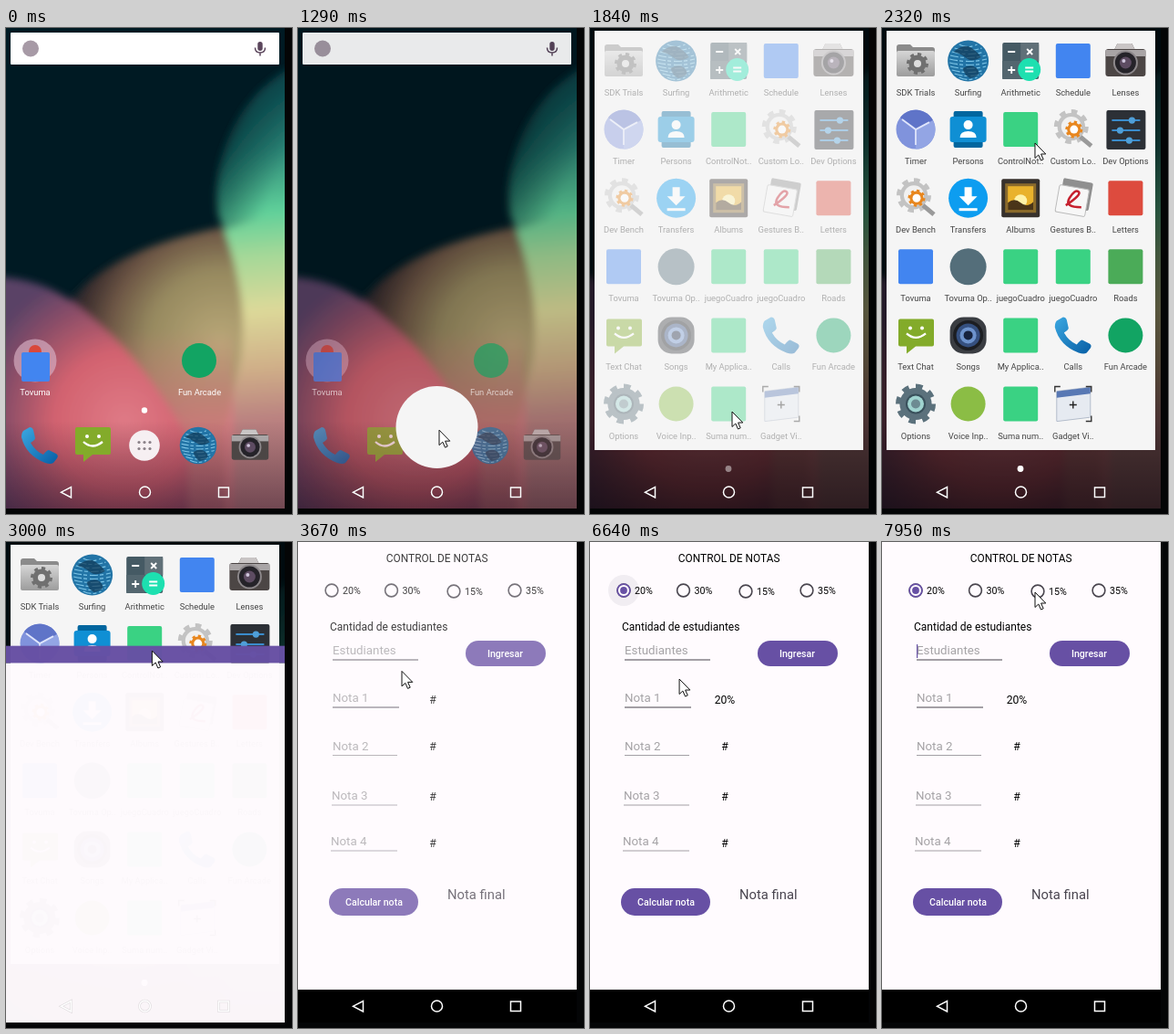
An HTML page that plays this animation: 314x532 px, repeating every 8000 ms.

```html
<!DOCTYPE html>
<html lang="es">
<head>
<meta charset="utf-8">
<title>Control de notas</title>
<style>
  html, body { margin: 0; width: 100%; height: 100%; overflow: hidden; background: #000; }
  svg { display: block; width: 314px; height: 532px; }
  text { font-family: Roboto, "Open Sans", sans-serif; }
  .label { font-size: 9.4px; text-anchor: middle; }
  .mid { text-anchor: middle; }
  .hint { font-size: 13.3px; fill: #a5a3a6; }
  .button { font-size: 10.6px; font-weight: 500; fill: #fff; text-anchor: middle; }
</style>
</head>
<body>
<svg id="stage" viewBox="0 0 314 532" xmlns="http://www.w3.org/2000/svg"></svg>
<script>
const LOOP = 8000;

// ---------- small drawing helpers ----------
const circle = (x, y, r, fill, extra = '') => `<circle cx="${x}" cy="${y}" r="${r}" fill="${fill}" ${extra}/>`;
const rect = (x, y, w, h, fill, rx = 0, extra = '') =>
  `<rect x="${x}" y="${y}" width="${w}" height="${h}" rx="${rx}" fill="${fill}" ${extra}/>`;
const path = (d, fill, extra = '') => `<path d="${d}" fill="${fill}" ${extra}/>`;
const line = (d, color, width, extra = '') =>
  `<path d="${d}" fill="none" stroke="${color}" stroke-width="${width}" ${extra}/>`;
const text = (x, y, str, cls, extra = '') => `<text x="${x}" y="${y}" class="${cls}" ${extra}>${str}</text>`;
const group = (id, body, extra = '') => `<g id="${id}" ${extra}>${body}</g>`;
const at = (x, y, body) => `<g transform="translate(${x} ${y})">${body}</g>`;
const stops = list => list.map(([o, c, a = 1]) =>
  `<stop offset="${o}" stop-color="${c}" stop-opacity="${a}"/>`).join('');
const linear = (id, x1, y1, x2, y2, ...list) =>
  `<linearGradient id="${id}" gradientUnits="userSpaceOnUse" x1="${x1}" y1="${y1}" x2="${x2}" y2="${y2}">${stops(list)}</linearGradient>`;
const radial = (id, x, y, r, ...list) =>
  `<radialGradient id="${id}" gradientUnits="userSpaceOnUse" cx="${x}" cy="${y}" r="${r}">${stops(list)}</radialGradient>`;
const gear = (r, color, hole, holeColor) =>
  circle(0, 0, r * .8, color) +
  circle(0, 0, r * .84, 'none', `stroke="${color}" stroke-width="${r * .32}" pathLength="16" stroke-dasharray="1 1"`) +
  circle(0, 0, hole, holeColor);

// ---------- icons, centred on 0,0 ----------
const square = (s, color) => rect(-s, -s, 2 * s, 2 * s, color, 2);
const disc = (r, color) => circle(0, 0, r, color);

function globe() {
  let bands = '';
  for (let y = -18; y <= 18; y += 4) {
    const w = Math.sqrt(420 - y * y);
    bands += line(`M${-w} ${y}Q0 ${y + 5} ${w} ${y}`, '#7cc4e6', 1.2, 'stroke-dasharray="9 2 4 3"');
  }
  return circle(0, 0, 22.5, '#2274a6') + bands +
    path('M-16-10Q-4-20 4-14T14-4Q4 2-2-3T-16-10Z', '#123c5a', 'opacity=".75"') +
    path('M-6 8Q4 2 10 9T2 19Q-4 16-6 8Z', '#123c5a', 'opacity=".7"');
}

const icon = {
  files: () => path('M-21-15Q-21-18-18-18H-6L-3-15H18Q21-15 21-12V15H-21Z', '#8b8b8b') +
    rect(-21, -11, 42, 28, 'url(#steel)', 2) + at(2, 3, gear(12, '#707070', 4, '#ddd')),
  globe,
  sums: () => rect(-20, -20, 40, 40, '#455a64', 2) + rect(0, -20, 20, 20, '#607078') +
    rect(-20, 0, 20, 20, '#53666f') +
    line('M-14-10H-6M7-13L13-7M13-13L7-7M-14 10H-6M-10 6V14', '#fff', 1.8) +
    circle(9.5, 9.5, 12.5, '#1de0b0') + line('M5 7.5H14M5 11.5H14', '#fff', 2),
  lens: () => path('M-9-19H7L10-13H19Q22-13 22-10V14Q22 17 19 17H-19Q-22 17-22 14V-10Q-22-13-19-13H-12Z', '#4c4645') +
    path('M-9-19H7L10-13H-12Z', '#c9c5c5') + rect(-22, -12, 44, 7, '#a9a5a6') +
    circle(0, 2, 13.5, '#8d888b') + circle(0, 2, 11.5, '#252329') + circle(0, 2, 6.5, '#5d4c62') + circle(-2, 0, 2, '#cfc6dc'),
  dial: () => circle(0, 0, 21.5, '#8093dc') + path('M0 0L-17-13A21.5 21.5 0 0 1 19-10Z', '#5f74c8') +
    path('M0 0L19-10A21.5 21.5 0 0 1 0 21.5Z', '#93a5e4') + line('M-15-11L0 0L15-8M0 0V17', '#dfe5fb', 1.8),
  people: () => rect(-16, -20, 32, 40, '#01669f', 2) + rect(-20, -14, 40, 28, '#0f8fd4', 3) +
    circle(0, -5, 5, '#fff') + path('M-9 9Q-9 2 0 2T9 9Z', '#fff'),
  cogs: () => at(-2, -3, gear(19, '#c3c3c3', 11, '#f1f1f1')) + line('M8 8L20 18', '#9a9a9a', 5) +
    at(1, 0, gear(9.5, '#e8871f', 4.5, '#fff')),
  sliders: () => rect(-21, -21, 43, 43, '#2c3036', 2) + line('M-15-10H16M-15 1H16M-15 12H16', '#3a8ccc', 2) +
    [[7, -10], [-6, 1], [4, 12]].map(([x, y]) => circle(x, y, 3.6, '#4f9fd8')).join(''),
  fetch: () => circle(0, 0, 21.5, '#0d9df0') + path('M-4-12H4V-2H10L0 8L-10-2H-4Z', '#fff') + rect(-10, 11, 20, 3, '#fff'),
  framed: () => rect(-21, -21, 42, 42, '#37312c', 2) + rect(-17, -16, 34, 32, '#8a6a2c') + rect(-14, -13, 28, 26, '#e9b22c') +
    circle(0, 3, 7, '#fff2a8') + path('M-14 13V5Q-7-1 0 5T14 4V13Z', '#4a3519'),
  strokes: () => `<g transform="rotate(10)">${rect(-14, -20, 33, 31, '#8f8f8f', 2)}${rect(-17, -12, 33, 30, '#f7f7f7', 2, 'stroke="#bbb"')}</g>` +
    line('M-8 8Q10-4 6-7T-4 0T9 10', '#c6202e', 2.6),
  bubble: () => path('M-17-18H18Q20-18 20-16V10Q20 12 18 12H0L-10 20V12H-17Q-19 12-19 10V-16Q-19-18-17-18Z', '#83ab2a') +
    circle(-6, -8, 2, '#fff') + circle(7, -8, 2, '#fff') + line('M-10-2Q0 7 11-2', '#fff', 2.3),
  speaker: () => rect(-20, -20, 40, 40, '#3a3d42', 15) + circle(0, 0, 16.5, '#1c1e22') +
    circle(0, 0, 13, '#35507f') + circle(0, 0, 9, '#6d93cd') + circle(0, 0, 5, '#16233f'),
  handset: () => path('M-18-16L-11-20Q-8-20-7-17L-5-8Q-5-6-10-3Q-5 6 4 10Q8 5 10 5L18 9Q21 11 19 14L15 19Q12 21 6 19Q-15 11-20-9Q-20-14-18-16Z', 'url(#blue)'),
  gear: () => gear(22, '#5b717c', 11, '#39505b') + circle(0, 0, 9, '#9fd3cf') + circle(0, 0, 5, '#6d8b92'),
  panel: () => `<g transform="skewY(-7)">${rect(-18, -16, 37, 33, '#e6eaf1', 1, 'stroke="#b3bccb"')}${rect(-18, -16, 37, 7, '#5878b4')}</g>` +
    line('M-20-13V-19H-14M14-19H20V-13M20 13V19H14', '#333', 1.4) + line('M-4 1H4M0-3V5', '#222', 1.4),
  sheet: () => square(19, '#3ad283'),
  blue: () => square(19, '#4285f0'),
  red: () => square(19, '#dd4b3e'),
  lime: () => square(19, '#4bab58'),
  green: () => disc(19, '#12a463'),
  slate: () => disc(20, '#546e7a'),
  leaf: () => disc(19, '#8bbd45')
};

const apps = [
  ['files', 'SDK Trials'], ['globe', 'Surfing'], ['sums', 'Arithmetic'], ['blue', 'Schedule'], ['lens', 'Lenses'],
  ['dial', 'Timer'], ['people', 'Persons'], ['sheet', 'ControlNot..'], ['cogs', 'Custom Lo..'], ['sliders', 'Dev Options'],
  ['cogs', 'Dev Bench'], ['fetch', 'Transfers'], ['framed', 'Albums'], ['strokes', 'Gestures B..'], ['red', 'Letters'],
  ['blue', 'Tovuma'], ['slate', 'Tovuma Op..'], ['sheet', 'juegoCuadro'], ['sheet', 'juegoCuadro'], ['lime', 'Roads'],
  ['bubble', 'Text Chat'], ['speaker', 'Songs'], ['sheet', 'My Applica..'], ['handset', 'Calls'], ['green', 'Fun Arcade'],
  ['gear', 'Options'], ['leaf', 'Voice Inp..'], ['sheet', 'Suma num..'], ['panel', 'Gadget Vi..']
];
const grid = apps.map(([kind, name], i) => {
  const x = 37 + (i % 5) * 57.6, y = 36 + Math.floor(i / 5) * 75.1;
  return at(x, y, icon[kind]()) + text(x, y + 38, name, 'label', 'fill="#444"');
}).join('');

// ---------- scenes ----------
const defs = `<defs>
  ${linear('steel', 0, -11, 0, 17, [0, '#d6d6d6'], [1, '#9c9c9c'])}
  ${linear('blue', -18, -18, 18, 18, [0, '#39a4de'], [1, '#0a62a8'])}
  ${linear('fan', 262, 50, 290, 430, [0, '#0b4a52'], [.22, '#2c8677'], [.4, '#5fd09a'], [.52, '#a3d898'], [.68, '#dcd999'], [.85, '#cfae88'], [1, '#b98080'])}
  ${linear('night', 226, 130, 300, 160, [0, '#001a23', .95], [.35, '#02343a', .6], [1, '#02343a', 0])}
  ${radial('dome', 235, 345, 175, [0, '#b9a878'], [.45, '#96895f'], [.7, '#6d5645'], [.88, '#3d2f2e'], [1, '#12202a'])}
  ${radial('rose', 130, 430, 170, [0, '#df7a86'], [.45, '#d2626f'], [.75, '#8f4f68'], [1, '#5a4266'])}
  ${linear('blush', 0, 330, 0, 440, [0, '#d67a80', 0], [1, '#d67a80', .85])}
  ${linear('shade', 0, 430, 0, 526, [0, '#2a1024', 0], [1, '#2a1024', .5])}
  <filter id="soft" x="-10%" y="-10%" width="120%" height="120%"><feGaussianBlur stdDeviation="4"/></filter>
  <clipPath id="screen"><rect width="306" height="526"/></clipPath>
  <clipPath id="reveal"><circle id="hole" cx="152.5" cy="232" r="0"/></clipPath>
</defs>`;

const fanShape = 'M330 35C255 65 224 145 233 205L240 222C256 270 264 310 258 360L240 440V550H330Z';
const wallpaper = rect(0, 0, 306, 526, '#001a23') + `<g filter="url(#soft)">` +
  path('M62 310C95 258 165 232 238 218L330 290V550H0V400Z', 'url(#dome)') +
  path(fanShape, 'url(#fan)') +
  path('M330 35C255 65 224 145 233 205L240 222L330 190Z', 'url(#night)') +
  path('M100 330H250V550H100Z', 'url(#blush)') +
  path('M-20 272C40 272 72 296 100 322C135 352 170 395 200 450V550H-20Z', 'url(#rose)') +
  '</g>' + rect(0, 430, 306, 96, 'url(#shade)');

const mic = rect(276.3, 15, 5.4, 10, '#5b465c', 2.7) +
  line('M273.5 21.5Q273.5 27 279 27T284.5 21.5M279 27V30.5', '#5b465c', 1.5);
const search = rect(5, 5, 295, 35, '#fff', 1) + circle(27, 22.5, 9, '#a79aa6') + mic;

let dots = '';
for (let i = 0; i < 6; i++) dots += circle(-6 + (i % 3) * 6, i < 3 ? -3.5 : 3.5, 1.6, '#8a8088');
const home = circle(32, 364, 23.5, '#d9b3c6', 'opacity=".65"') + circle(32, 354, 7, '#d9483b') +
  rect(17, 355, 31, 32, '#4285f0', 2) + text(32, 402, 'Tovuma', 'label', 'fill="#fff"') +
  at(212, 364, icon.green()) + text(212.5, 402, 'Fun Arcade', 'label', 'fill="#fff"') +
  circle(152, 418.5, 3.2, '#fff') +
  at(37, 457, icon.handset()) + at(95, 455, icon.bubble()) + at(152, 457, circle(0, 0, 16.8, '#f6eff2') + dots) +
  at(211, 457, `<g transform="scale(.9)">${globe()}</g>`) + at(268, 457, `<g transform="scale(.92)">${icon.lens()}</g>`);

const field = (x, y, w, name, color) =>
  text(x, y, name, 'hint') + rect(x, y + 5.5, w, 1, color);
const radio = (x, y, name) =>
  circle(x, y, 6.9, 'none', 'stroke="#4a464f" stroke-width="1.6"') + text(x + 12, y + 4, name, '', 'font-size="10.7"');
const hash = (y, id = '') => text(148, y, '#', 'mid', `font-size="12.2" id="${id}"`);

const form = text(152.7, 22, 'CONTROL DE NOTAS', 'mid', 'font-size="11.9"') +
  group('ripple', circle(37, 53, 17, '#f1edf2')) +
  radio(37, 53, '20%') + radio(102.5, 53, '30%') + radio(171, 54, '15%') + radio(238, 53, '35%') +
  group('picked', circle(37, 53, 6.9, '#fffbfe', 'stroke="#6750a4" stroke-width="1.7"') + circle(37, 53, 3.9, '#6750a4')) +
  text(35, 97, 'Cantidad de estudiantes', '', 'font-size="12"') +
  field(38, 123, 94, 'Estudiantes', '#49454f') + rect(38, 112, 1.2, 15, '#6750a4', 0, 'id="caret"') +
  rect(184, 108, 88, 28, '#6750a4', 14) + text(227.5, 126, 'Ingresar', 'button') +
  field(38, 175, 73, 'Nota 1', '#49454f') + field(38, 227.5, 71, 'Nota 2', '#a3a0a5') +
  field(37, 282, 72, 'Nota 3', '#a3a0a5') + field(36, 332, 73, 'Nota 4', '#a3a0a5') +
  hash(177, 'share') + hash(228) + hash(283) + hash(334) +
  rect(34, 379, 98, 30, '#6750a4', 15) + text(83.5, 398, 'Calcular nota', 'button') +
  text(164, 391, 'Nota final', '', 'font-size="14.8" fill="#49454f"');

const page = rect(0, -19, 306, 19, '#6750a4') + rect(0, 0, 306, 490, '#fffbfe') +
  rect(0, 490, 306, 60, '#000') + group('form', form);

const navShape = 'M71.5 502.5V514L60.5 508.2ZM158.5 508A6 6 0 1 1 146.5 508A6 6 0 1 1 158.5 508ZM233.5 503H244.5V513.5H233.5Z';
const nav = line(navShape, '#000', 2.6, 'opacity=".12"') + line(navShape, '#fff', 1.5);

const pointer = path('M0 0V16.5L3.8 13L6.5 19L9.2 17.8L6.6 12H11.8Z', '#fff', 'stroke="#111" stroke-width="1" stroke-linejoin="round"');

document.getElementById('stage').innerHTML = defs + rect(0, 0, 314, 532, '#040506') +
  `<g clip-path="url(#screen)">` +
  wallpaper + rect(0, 0, 306, 526, '#000', 0, 'id="dim"') +
  group('search', search) + group('home', home) +
  group('pageDot', circle(152, 482.5, 3.4, '#fff')) +
  `<g clip-path="url(#reveal)">` + group('drawer', rect(5, 3, 295, 459, '#f5f5f5') + group('grid', grid)) + '</g>' +
  group('page', page) + nav + '</g>' +
  group('press', circle(0, 0, 12, '#ffff00', 'opacity=".47"')) + group('pointer', pointer);

// ---------- timing ----------
// start, end, number of steps
const bursts = [
  [190, 940, 10], [1010, 1750, 11], [1840, 2600, 12], [2730, 2730, 1], [2870, 3270, 7], [3470, 3810, 6],
  [3960, 4720, 11], [4790, 5330, 7], [5530, 6300, 12], [6370, 6370, 1], [6510, 7310, 12], [7390, 7950, 9]
];
function snap(t) {
  let held = 0;
  for (const [from, to, n] of bursts) {
    if (t < from) break;
    const gap = n > 1 ? (to - from) / (n - 1) : 1;
    held = from + gap * Math.min(n - 1, Math.floor((t + 20 - from) / gap));
  }
  return held;
}

// rows of [time, value, ...]
function tween(rows, t) {
  const next = rows.findIndex(r => r[0] > t);
  if (next === 0) return rows[0].slice(1);
  if (next < 0) return rows[rows.length - 1].slice(1);
  const a = rows[next - 1], b = rows[next], p = (t - a[0]) / (b[0] - a[0]);
  return a.slice(1).map((v, i) => v + (b[i + 1] - v) * p);
}

const travel = [
  [190, 268, 504], [440, 255, 440], [770, 205, 392], [940, 183, 383], [1084, 155, 441], [1602, 155, 439],
  [1840, 156, 420], [2120, 170, 190], [2323, 168, 126], [2600, 161, 119], [3270, 160, 119],
  [3470, 150, 124], [3810, 90, 153], [3960, 88, 150], [4400, 62, 100], [4720, 45, 58], [4790, 45, 57],
  [4970, 62, 46], [5150, 84, 44], [5330, 75, 52], [5530, 73, 54], [5900, 56, 66], [6230, 41, 52], [6300, 40, 51],
  [6510, 42, 54], [6655, 98, 150], [6950, 140, 187], [7310, 152, 179], [7390, 152, 176], [7700, 164, 95], [7950, 168, 55]
];
const opening = [[1230, 225, 0], [1306, 205, 45], [1602, 78, 197.5], [1750, 18, 262], [1840, 0, 300]];
const slide = [[2869, 560, 0], [2870, 420, .35], [2937, 250, .75], [3003, 133, .975], [3070, 66, 1], [3137, 28, 1], [3203, 8, 1], [3270, 0, 1]];
const presses = [[1084, 1190], [2600, 2730], [6300, 6370]];

const el = {};
document.querySelectorAll('#stage [id]').forEach(n => el[n.id] = n);
const fade = (name, value) => el[name].setAttribute('opacity', value);
const move = (name, x, y) => el[name].setAttribute('transform', `translate(${x} ${y})`);
const ramp = (t, from, to) => Math.min(1, Math.max(0, (t - from) / (to - from)));

function draw(now) {
  const t = snap(now % LOOP);

  const [x, y] = tween(travel, t);
  move('pointer', x, y);
  move('press', x, y);
  fade('pointer', t >= 190 ? 1 : 0);
  fade('press', presses.some(([a, b]) => t >= a && t < b) ? 1 : 0);

  const [drop, radius] = tween(opening, t);
  move('drawer', 0, drop);
  el.hole.setAttribute('cy', 232 + drop);
  el.hole.setAttribute('r', radius);
  fade('dim', .6 * ramp(t, 1200, 1650));
  fade('search', 1 - .42 * ramp(t, 1230, 1602) - .58 * ramp(t, 1602, 1800));
  fade('home', 1 - ramp(t, 1200, 1520));
  fade('grid', ramp(t, 1740, 2000));
  fade('pageDot', ramp(t, 1750, 1950));

  const [shift, solid] = tween(slide, t);
  move('page', 0, shift);
  fade('page', solid);
  fade('form', ramp(t, 3420, 3760));

  const chosen = t >= 6510;
  fade('picked', chosen ? 1 : 0);
  fade('ripple', chosen ? 1 - ramp(t, 6680, 6960) : 0);
  el.share.textContent = chosen ? '20%' : '#';
  fade('caret', (t + 210) % 1000 < 500 ? 1 : 0);
}

const begin = performance.now();
function tick() {
  draw(performance.now() - begin);
  requestAnimationFrame(tick);
}
tick();
</script>
</body>
</html>
```
